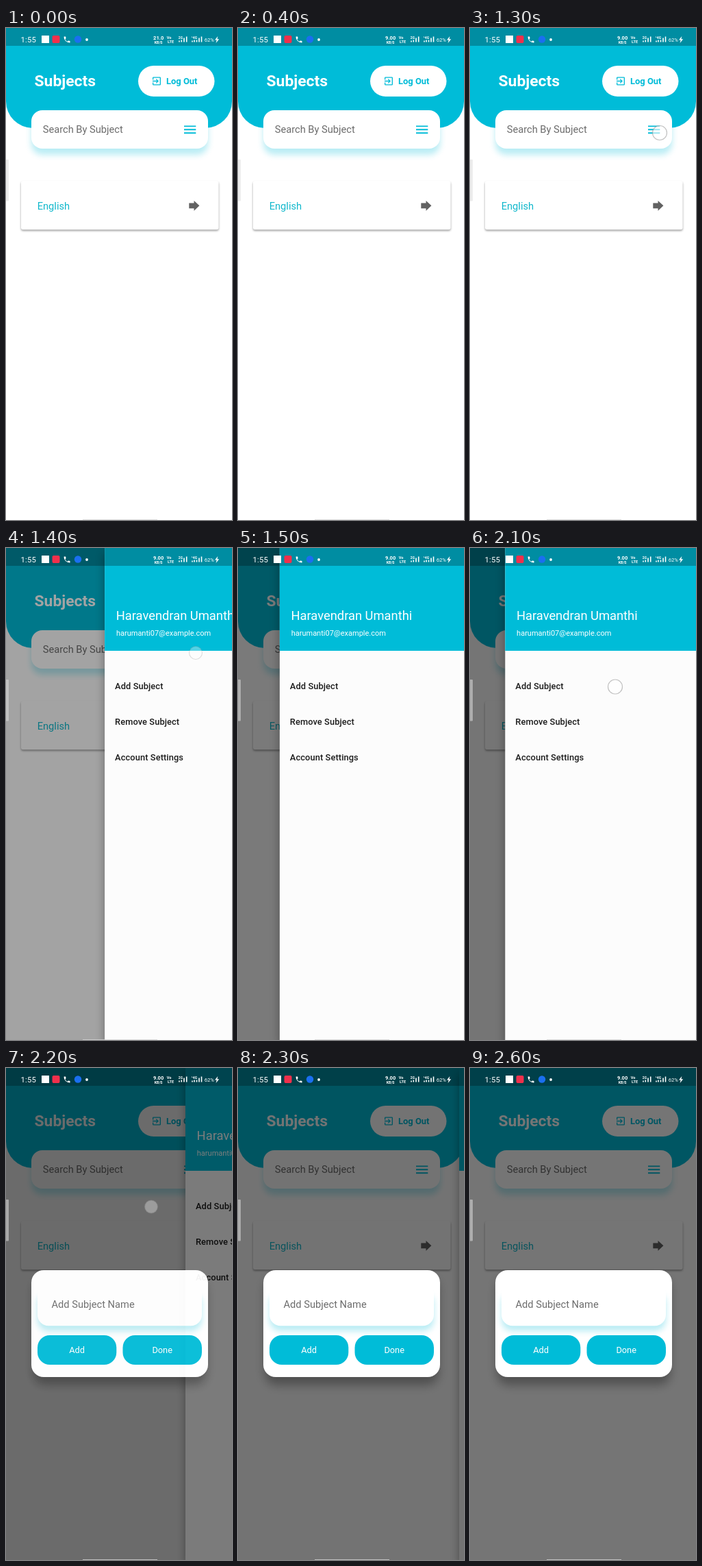
Recreate the animation shown at these times as an HTML page. Size 330 px wide and 718 px high, loop 2700 ms.

```html
<!DOCTYPE html>
<html lang="en">
<head>
<meta charset="utf-8">
<title>Subjects</title>
<style>
  html, body { margin: 0; width: 100%; height: 100%; overflow: hidden; background: #fff; }
  svg { display: block; font-family: Roboto, sans-serif; }
  #stage { width: 330px; height: 718px; }
  .cyan { fill: #00bcd8; }
  .white { fill: #fff; }
  .hint { font-size: 14.67px; fill: #6c6c6c; }
  .item { font-size: 12.83px; font-weight: 500; letter-spacing: .09px; fill: #1c1c1c; }
  .button { font-size: 12.83px; fill: #fff; text-anchor: middle; }
  .glow { fill: #00bcd8; opacity: .27; filter: blur(5px); }
  .soft { filter: blur(7px); }
  .tiny { font-weight: 700; }
</style>
</head>
<body>
<svg id="stage" viewBox="0 0 330 718">
  <!-- Subject list -->
  <rect class="white" width="330" height="718"/>
  <path class="cyan" d="M0 0H330V107A39 39 0 0 1 291 146H39A39 39 0 0 1 0 107Z"/>
  <rect width="330" height="26" opacity=".25"/>
  <text class="white" x="41.5" y="85.3" font-size="22.9" font-weight="700">Subjects</text>
  <rect class="white" x="193" y="55" width="111.5" height="45" rx="22.5"/>
  <svg class="cyan" x="212" y="69.5" width="16" height="16" viewBox="0 0 24 24">
    <path d="M10.1 15.6 11.5 17l5-5-5-5-1.4 1.4L12.7 11H3v2h9.7zM19 3H5a2 2 0 0 0-2 2v4h2V5h14v14H5v-4H3v4a2 2 0 0 0 2 2h14a2 2 0 0 0 2-2V5a2 2 0 0 0-2-2z"/>
  </svg>
  <text class="cyan" x="234" y="82" font-size="12.95" font-weight="700">Log Out</text>

  <rect class="glow" x="37" y="129" width="258" height="56" rx="16"/>
  <rect class="white" x="37" y="120" width="258" height="56" rx="16"/>
  <text class="hint" x="53.7" y="153.3">Search By Subject</text>
  <path d="M260 143.4h17.3M260 148.3h17.3M260 153.2h17.3" stroke="#00bcd8" stroke-width="1.9"/>

  <rect x="22" y="225" width="288.5" height="71" rx="3" opacity=".38" style="filter:blur(1.4px)"/>
  <rect class="white" x="22" y="223" width="288.5" height="71.3" rx="3"/>
  <text x="45.7" y="264.6" font-size="14.67" fill="#12b8cc">English</text>
  <path d="M267.3 255.4h7.2v-3.5l7.9 7.4-7.9 7.4v-3.5h-7.2z" fill="#616161"/>

  <!-- Drawer -->
  <rect id="scrim" width="330" height="718"/>
  <g id="drawer">
    <rect class="soft" y="8" width="279" height="718" opacity=".35"/>
    <rect width="279" height="718" fill="#fcfcfc"/>
    <rect class="cyan" width="279" height="150"/>
    <rect width="279" height="26" opacity=".25"/>
    <text class="white" x="16.6" y="105.2" font-size="18.33">Haravendran Umanthi</text>
    <text class="white" x="16.8" y="128.3" font-size="11">harumanti07@example.com</text>
    <text class="item" x="15" y="206">Add Subject</text>
    <text class="item" x="15" y="257.8">Remove Subject</text>
    <text class="item" x="15" y="309.5">Account Settings</text>
  </g>

  <!-- Dialog -->
  <g id="dialog">
    <rect width="330" height="718" opacity=".54"/>
    <rect class="soft" x="39" y="305" width="254" height="158" rx="18" opacity=".3"/>
    <rect class="white" x="37" y="295" width="258" height="156" rx="18"/>
    <rect class="glow" x="46" y="328" width="240" height="56" rx="16" style="clip-path:inset(-30px -9px)"/>
    <rect class="white" x="46" y="314" width="240" height="62.3" rx="16"/>
    <text class="hint" x="66.5" y="350">Add Subject Name</text>
    <rect class="cyan" x="46" y="390" width="115.3" height="43" rx="18"/>
    <rect class="cyan" x="170.5" y="390" width="115.5" height="43" rx="18"/>
    <text class="button" x="103.6" y="416">Add</text>
    <text class="button" x="228.2" y="416">Done</text>
  </g>

  <circle id="touch" r="10.5" fill="#fff" fill-opacity=".6" stroke="#999" stroke-opacity=".6" stroke-width="1.2"/>

  <!-- System bar -->
  <g class="white">
    <text x="21.5" y="20.7" font-size="11.3" letter-spacing=".15">1:55</text>
    <rect x="52" y="11" width="11" height="11"/>
    <rect x="67.5" y="11" width="11" height="11" rx="2" fill="#f0304c"/>
    <svg x="83" y="11" width="12" height="12" viewBox="0 0 24 24">
      <path d="M6.6 10.8a15 15 0 0 0 6.6 6.6l2.2-2.2a1 1 0 0 1 1-.24 11 11 0 0 0 3.6.57 1 1 0 0 1 1 1V20a1 1 0 0 1-1 1A17 17 0 0 1 3 4a1 1 0 0 1 1-1h3.5a1 1 0 0 1 1 1 11 11 0 0 0 .57 3.6 1 1 0 0 1-.25 1z"/>
    </svg>
    <circle cx="105" cy="16.5" r="5.2" fill="#1a6ff0"/>
    <circle cx="118" cy="17" r="1.9"/>
    <g class="tiny" text-anchor="middle">
      <text id="speed" x="222.7" y="17" font-size="7.6"></text>
      <text x="222.7" y="22.8" font-size="5.2">KB/S</text>
      <text x="238" y="16.4" font-size="5.6">Vo</text>
      <text x="240.5" y="21.6" font-size="5.6">LTE</text>
      <text x="255" y="16" font-size="5">2G</text>
      <text x="275" y="16" font-size="5">⁺4G</text>
    </g>
    <path d="M253 20.5v-2M256.3 20.5v-3M260 20.5v-6M263.7 20.5v-8M272 20.5v-2M275 20.5v-3M278.5 20.5v-3M282 20.5v-6M285.5 20.5v-8" stroke="#fff" stroke-width="1.6"/>
    <text x="289.7" y="19.6" font-size="7.6">62%</text>
    <path d="M309.3 12l-4.3 5.4h2.7l-1.2 4.6 4.7-5.8h-2.8z"/>
  </g>
  <rect x="-3" y="192" width="7" height="60.5" rx="1" fill="#dcdcdc" opacity=".55"/>
  <path d="M112 717.5H221" stroke="#d4d4d4" opacity=".8"/>
</svg>
<script>
  const LOOP = 2700, TICK = 100, DRAWER_WIDTH = 278.7;
  const $ = id => document.getElementById(id);
  const [scrim, drawer, dialog, touch, speed] =
    ['scrim', 'drawer', 'dialog', 'touch', 'speed'].map($);

  const settle = ms => Math.exp(-ms / 44);

  function drawerOpen(t) {
    if (t < 1400) return 0;
    if (t < 2200) return 1 - 0.333 * settle(t - 1400);
    return 0.244 * settle(t - 2200);
  }

  // A tap stays down for two ticks, then shrinks and fades for one.
  function tapAt(t, start, x, y) {
    const age = t - start;
    if (age < 0 || age >= 300) return false;
    const fading = age >= 200;
    touch.setAttribute('transform', `translate(${x} ${y}) scale(${fading ? 0.9 : 1})`);
    touch.setAttribute('opacity', fading ? 0.55 : 1);
    return true;
  }

  function draw(t) {
    const open = drawerOpen(t);
    scrim.setAttribute('opacity', 0.54 * open);
    drawer.setAttribute('transform', `translate(${330 - DRAWER_WIDTH * open} 0)`);
    drawer.style.display = open > 0.005 ? '' : 'none';
    dialog.setAttribute('opacity', t < 2200 ? 0 : t < 2300 ? 0.95 : 1);
    const touched = tapAt(t, 1200, 277, 153) || tapAt(t, 2000, 212, 202.5);
    touch.style.display = touched ? '' : 'none';
    speed.textContent = t < 300 ? '21.0' : '9.00';
  }

  const begin = performance.now();
  function frame() {
    const t = (performance.now() - begin) % LOOP;
    draw(Math.floor(t / TICK) * TICK);
    requestAnimationFrame(frame);
  }
  frame();
</script>
</body>
</html>
```
